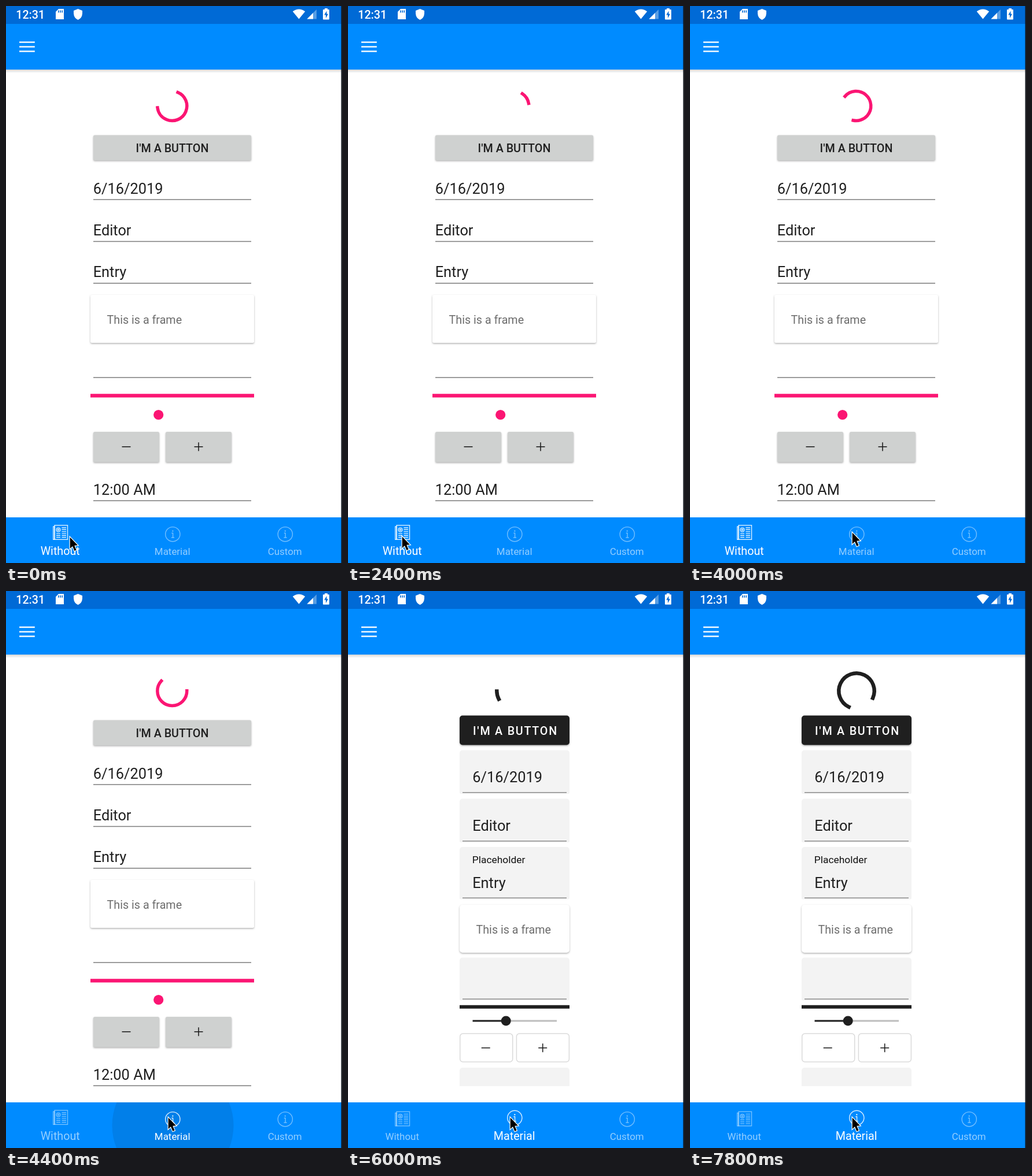
An HTML page with a canvas that plays this animation: 581 by 964 pixels, repeating every 8000 ms.

```html
<!DOCTYPE html>
<html lang="en">
<head>
<meta charset="utf-8">
<title>Controls demo</title>
<style>
html, body { margin: 0; width: 100%; height: 100%; overflow: hidden; background: #fff; }
canvas { display: block; }
</style>
</head>
<body>
<canvas id="stage" width="581" height="964"></canvas>
<script>
const ctx = document.getElementById('stage').getContext('2d');
const W = 581, H = 964, LOOP = 8000, STEP = 200;
const BLUE = '#008bff', PINK = '#fb1573', INK = '#1f1f1f', GREY = '#cfd1d0';
const TAP = 4400, SWAP = 4600;

// ---- helpers ----
function rect(x, y, w, h, color, r = 0) {
  ctx.fillStyle = color;
  ctx.beginPath();
  ctx.roundRect(x, y, w, h, r);
  ctx.fill();
}

function disc(x, y, r, color) {
  ctx.fillStyle = color;
  ctx.beginPath();
  ctx.arc(x, y, r, 0, Math.PI * 2);
  ctx.fill();
}

function shape(points, color) {
  ctx.fillStyle = color;
  ctx.beginPath();
  points.forEach(([x, y]) => ctx.lineTo(x, y));
  ctx.closePath();
  ctx.fill();
}

function text(str, x, y, size, color, { align = 'left', weight = 400, spacing = 0 } = {}) {
  ctx.font = `${weight} ${size}px Roboto, sans-serif`;
  ctx.letterSpacing = spacing + 'px';
  ctx.textAlign = align;
  ctx.fillStyle = color;
  ctx.fillText(str, x, y);
  ctx.letterSpacing = '0px';
}

function raised(x, y, w, h, color, r, alpha = 0.3) {
  ctx.save();
  ctx.shadowColor = `rgba(0,0,0,${alpha})`;
  ctx.shadowBlur = 3;
  ctx.shadowOffsetY = 1.5;
  rect(x, y, w, h, color, r);
  ctx.restore();
}

const rule = (x1, x2, y, color = '#7b7b7b') => rect(x1, y - 0.7, x2 - x1, 1.4, color);

function sign(x, y, plus) {
  rect(x - 7.5, y - 0.8, 15, 1.6, INK);
  if (plus) rect(x - 0.8, y - 7.5, 1.6, 15, INK);
}

const clamp = v => Math.min(1, Math.max(0, v));
const smooth = v => { v = clamp(v); return v * v * (3 - 2 * v); };

// ---- spinner: trim, offset and rotation run together ----
function trim(x) {
  x = clamp(x * 2) / 2;
  let lo = 0, hi = 1;
  for (let i = 0; i < 24; i++) {
    const u = (lo + hi) / 2, v = 1 - u;
    if (0.6 * u * v * v + 0.3 * u * u * v + 0.5 * u * u * u < x) lo = u; else hi = u;
  }
  return smooth(lo);
}

function spinner(x, y, r, width, color, elapsed) {
  const p = (elapsed % 1333) / 1333;
  const base = elapsed * 720 / 4444 + 90 * p - 90;
  const from = base + 270 * trim(p - 0.5);
  const to = base + 270 * trim(p) + 0.1;
  const rad = Math.PI / 180;
  ctx.strokeStyle = color;
  ctx.lineWidth = width;
  ctx.lineCap = 'square';
  ctx.beginPath();
  ctx.arc(x, y, r, from * rad, to * rad);
  ctx.stroke();
  ctx.lineCap = 'butt';
}

// ---- pages ----
function plainPage(t) {
  spinner(287.3, 173, 25.5, 5.5, PINK, t + 4412);
  raised(151, 223.5, 273, 43.5, GREY, 2.5);
  text("I'M A BUTTON", 287.5, 253, 19.72, INK, { align: 'center', weight: 500 });
  [['6/16/2019', 324.5, 335], ['Editor', 397, 407.5], ['Entry', 469, 479.8], ['', 0, 643], ['12:00 AM', 846, 856.3]]
    .forEach(([str, base, line]) => {
      text(str, 150.7, base, 25.36, INK);
      rule(151, 424, line);
    });
  raised(146, 500, 283, 83, '#fff', 2.5);
  text('This is a frame', 174.6, 550, 19.72, '#6c6c6c');
  rect(146, 671.3, 283, 6.2, PINK);
  disc(263.7, 707.5, 8.6, PINK);
  [151, 276].forEach((x, i) => {
    raised(x, 737, 114, 52.5, GREY, 2.5);
    sign(x + 57, 762.8, i);
  });
}

function materialPage(t) {
  spinner(288, 173, 30.7, 6.5, INK, t - 4550);
  raised(193, 215.5, 190, 51, INK, 5);
  text("I'M A BUTTON", 216, 249, 19.72, '#fff', { weight: 500, spacing: 1.76 });
  [['6/16/2019', 275.5, 75.5, 331], ['Editor', 359.5, 75.5, 415], ['Entry', 443, 90.5, 514], ['', 634.5, 74, 0]]
    .forEach(([str, top, h, base]) => {
      rect(193, top, 190, h, '#f3f3f3', [5, 5, 2, 2]);
      rule(198, 378, top + h - 2.3, '#8c8c8c');
      text(str, 215.2, base, 25.36, INK);
    });
  const k = smooth((t - SWAP) / 167);
  text('Placeholder', 214.8, 510.5 - 40 * k, 25.36 - 7.96 * k, '#111');
  raised(193, 543, 190, 83, '#fff', 5);
  text('This is a frame', 221.5, 592.5, 19.72, '#6c6c6c');
  rect(193, 716.7, 190, 6, INK);
  rect(215.5, 742.6, 58, 2.8, INK);
  rect(273, 742.6, 88, 2.8, '#bdbdbd');
  disc(273.2, 744, 8.5, INK);
  [193.7, 291.4].forEach((x, i) => {
    ctx.strokeStyle = '#dadada';
    ctx.lineWidth = 1.5;
    ctx.beginPath();
    ctx.roundRect(x, 766, 91, 49, 5);
    ctx.stroke();
    sign(x + (i ? 45.3 : 44.5), 790.7, i);
  });
  rect(193, 825, 190, 32, '#f3f3f3', [5, 5, 0, 0]);
}

// ---- bars ----
function statusBar() {
  rect(0, 0, W, 31, '#006ad6');
  text('12:31', 17.2, 22, 19.72, '#fff', { weight: 500 });

  shape([[91, 5], [100, 5], [100, 23], [86, 23], [86, 10]], '#fff');
  [90, 93.2, 96.4].forEach(x => rect(x, 7.5, 1.6, 4, '#006ad6'));

  ctx.fillStyle = '#fff';
  ctx.beginPath();
  ctx.moveTo(124.5, 5);
  ctx.lineTo(132, 8);
  ctx.lineTo(132, 13);
  ctx.quadraticCurveTo(131.5, 21, 124.5, 24);
  ctx.quadraticCurveTo(117.5, 21, 117, 13);
  ctx.lineTo(117, 8);
  ctx.fill();

  ctx.beginPath();
  ctx.moveTo(506.5, 22.5);
  ctx.lineTo(495.8, 9.5);
  ctx.quadraticCurveTo(506.5, 1.5, 517.2, 9.5);
  ctx.fill();

  shape([[537, 6], [537, 22.5], [520.5, 22.5]], 'rgba(255,255,255,.35)');
  shape([[531, 12], [531, 22.5], [520.5, 22.5]], '#fff');

  rect(551, 4, 5, 4, '#fff');
  rect(548, 6, 11, 17.5, '#fff', 1);
  shape([[554.5, 8.5], [550.3, 15.6], [553, 15.6], [553, 21], [557, 13.8], [554.5, 13.8]], '#006ad6');
}

function appBar() {
  const fade = ctx.createLinearGradient(0, 110, 0, 116);
  fade.addColorStop(0, 'rgba(0,0,0,.16)');
  fade.addColorStop(1, 'rgba(0,0,0,0)');
  rect(0, 110, W, 6, fade);
  rect(0, 31, W, 79, BLUE);
  [61.4, 69.3, 77.2].forEach(y => rect(23, y, 26.8, 2.5, '#f4faff'));
}

function feedIcon(x, y) {
  ctx.lineWidth = 1.4;
  ctx.strokeRect(x + 3, y + 0.7, 22.5, 24.6);
  ctx.strokeRect(x + 0.7, y + 3, 2.3, 22.3);
  ctx.beginPath();
  ctx.arc(x + 9.5, y + 8.5, 3.4, 0, 7);
  ctx.moveTo(x + 10.8, y + 8.5);
  ctx.arc(x + 9.5, y + 8.5, 1.3, 0, 7);
  for (let i = 0; i < 6; i++) {
    const ly = y + 5 + i * 3.3;
    ctx.moveTo(x + 15.5, ly);
    ctx.lineTo(x + 23, ly);
    if (i > 2) {
      ctx.moveTo(x + 6, ly);
      ctx.lineTo(x + 13, ly);
    }
  }
  ctx.stroke();
}

function infoIcon(x, y) {
  ctx.lineWidth = 1.4;
  ctx.beginPath();
  ctx.arc(x, y, 12.6, 0, Math.PI * 2);
  ctx.moveTo(x - 2, y - 2);
  ctx.lineTo(x + 0.3, y - 2);
  ctx.lineTo(x + 0.3, y + 5.8);
  ctx.moveTo(x - 2.4, y + 5.8);
  ctx.lineTo(x + 2.8, y + 5.8);
  ctx.stroke();
  disc(x, y - 5.6, 1.2, ctx.strokeStyle);
}

function tabBar(t) {
  rect(0, 885, W, 79, BLUE);
  if (t >= TAP && t < SWAP) {
    ctx.save();
    ctx.beginPath();
    ctx.rect(0, 885, W, 79);
    ctx.clip();
    disc(288.5, 925, 105, 'rgba(12,60,110,.15)');
    ctx.restore();
  }
  const lit = t < TAP ? 0 : 1, large = t < SWAP ? 0 : 1;
  ['Without', 'Material', 'Custom'].forEach((label, i) => {
    const x = [94, 288, 482.5][i];
    const drop = i === large ? 0 : 2.4;
    ctx.strokeStyle = `rgba(255,255,255,${i === lit ? 0.85 : 0.45})`;
    if (i) infoIcon(x + 0.3, 911.8 + drop); else feedIcon(x - 13, 898 + drop);
    text(label, x - 0.3, 950.3, i === large ? 19.72 : 16.95,
      `rgba(255,255,255,${i === lit ? 1 : 0.58})`, { align: 'center' });
  });
}

function pointer(t) {
  const a = smooth((t - 200) / 800);
  const b = smooth((t - 2700) / 986);
  const x = 110 - 17 * a + 187 * b;
  const y = 918 - a - 7 * b - 5.6 * Math.sin(Math.PI * b);
  ctx.save();
  ctx.translate(x, y);
  ctx.lineJoin = 'miter';
  ctx.beginPath();
  [[0.7, 1.5], [0.7, 21], [5, 17], [8.4, 25], [11.6, 23.6], [8.3, 15.8], [14, 15.3]]
    .forEach(([px, py]) => ctx.lineTo(px, py));
  ctx.closePath();
  ctx.strokeStyle = '#fff';
  ctx.lineWidth = 2.4;
  ctx.stroke();
  ctx.fillStyle = '#000';
  ctx.fill();
  ctx.restore();
}

function draw(t) {
  rect(0, 0, W, H, '#fff');
  (t < SWAP ? plainPage : materialPage)(t);
  appBar();
  statusBar();
  tabBar(t);
  rect(579.6, 0, 1.4, H, '#10151c');
  pointer(t);
}

const start = performance.now();
function tick() {
  const t = (performance.now() - start) % LOOP;
  draw(Math.floor(t / STEP) * STEP);
  requestAnimationFrame(tick);
}
tick();
</script>
</body>
</html>
```
